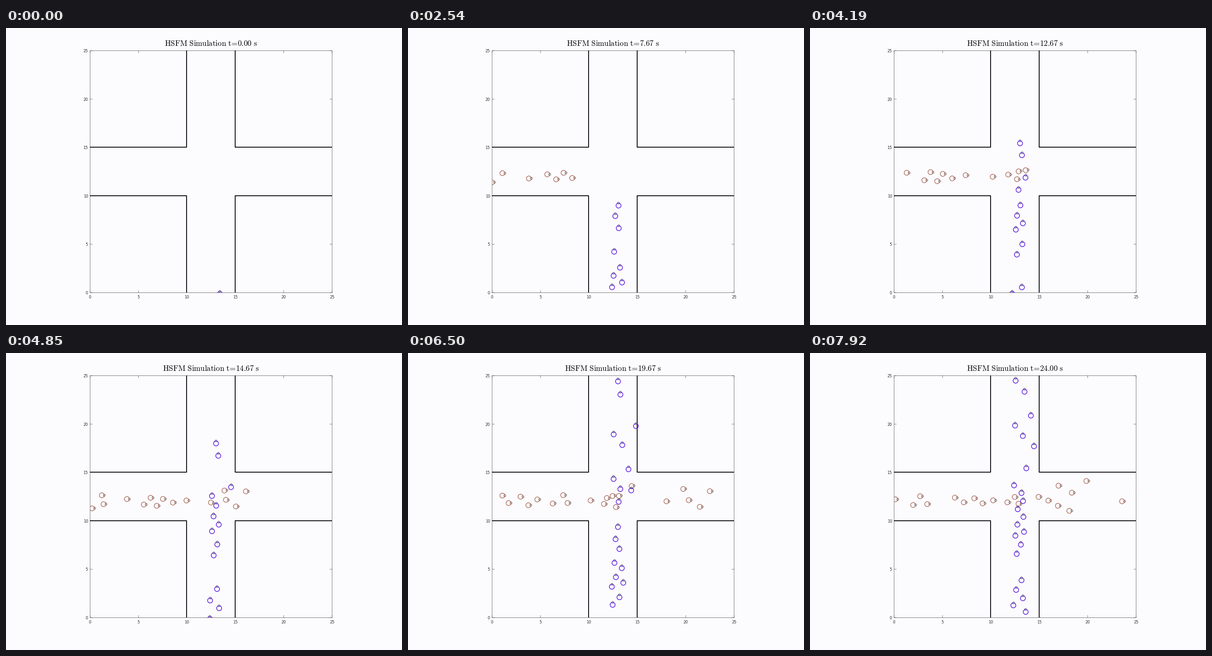
Animation of 864 by 648 pixels, one loop 8000 ms. Source, as a matplotlib script:

```python
import matplotlib.pyplot as plt
import numpy as np
from matplotlib.animation import FuncAnimation
from matplotlib.patches import Rectangle

plt.rcParams.update({"mathtext.fontset": "cm", "font.family": "DejaVu Sans"})

# The stage is laid out in pixels, y pointing down.
WIDTH, HEIGHT, DPI = 864, 648, 72
LEFT, BOTTOM, METRE, SIZE = 183, 577, 21.12, 25
INTERVAL, FRAMES, STEP_MS = 40, 200, 110
LAST_STEP, SUBSTEPS = 72, 5
INK = "#262626"

# Crowd model, in pixels and animation steps.
CRUISE, RELAX = 9.0, 2.0
CENTERING = 14.0
PUSH, PUSH_RANGE = 4.0, 4.0
BEHIND_WEIGHT = 0.25
BODY, HEAD = 10.8, 4.6
CROSSING = np.array([457.0, 323.0])
GATE_X, GATE_Y = 181, 580

# Steps at which people walk in from the left and from below.
EAST_ARRIVALS = [2, 3, 4, 7, 12, 18.6, 22, 24, 25, 26, 27.6, 33,
                 38.8, 39.2, 42, 46, 48, 50, 53, 54.4, 62, 63.6, 65, 70.4]
NORTH_ARRIVALS = [0, 1.6, 5.2, 11, 15, 16.6, 18.4, 19.4, 24.2, 26.6, 35, 37.8, 39.8,
                  44, 45, 45.6, 47, 48.6, 52, 53.6, 61, 62.8, 64.8, 67, 68.8]


def spread(count, rng):
    """Lateral entry offsets, alternating between the two sides."""
    return rng.uniform(2, 17, count) * (-1) ** np.arange(count)


def simulate():
    """Return positions, head positions and presence for every step."""
    rng = np.random.default_rng(4)
    n_east, n_north = len(EAST_ARRIVALS), len(NORTH_ARRIVALS)
    arrivals = np.array(EAST_ARRIVALS + NORTH_ARRIVALS)
    forward = np.repeat([[1.0, 0.0], [0.0, -1.0]], [n_east, n_north], axis=0)
    side = np.abs(forward[:, ::-1])
    gate = np.repeat([[GATE_X, CROSSING[1]], [CROSSING[0], GATE_Y]],
                     [n_east, n_north], axis=0)
    offset = np.concatenate([spread(n_east, rng), spread(n_north, rng)])
    pos = gate + side * offset[:, None]
    vel = np.zeros_like(pos)
    dt = 1 / SUBSTEPS
    record = []

    for tick in range(LAST_STEP * SUBSTEPS + 1):
        active = arrivals <= tick * dt + 1e-9
        if tick % SUBSTEPS == 0:
            turn = np.clip(np.sum(vel * side, axis=1) / CRUISE, -.15, .15)
            heads = pos + BODY / 2 * (forward + side * turn[:, None])
            record.append((pos.copy(), heads, active))

        # Aim for the middle of the crossing, then keep straight on.
        to_center = np.sum((CROSSING - pos) * side, axis=1)
        before = np.sum((CROSSING - pos) * forward, axis=1) > 0
        desired = CRUISE * forward + side * (before * to_center / CENTERING)[:, None]

        # Keep clear of others, above all of those ahead.
        gap = pos[:, None] - pos[None]
        dist = np.maximum(np.linalg.norm(gap, axis=2), 1e-6)
        ahead = np.sum(gap * forward[:, None], axis=2) < 0
        push = PUSH * np.exp((BODY - dist) / PUSH_RANGE)
        push *= np.where(ahead, 1, BEHIND_WEIGHT) * (active[:, None] & active[None])
        repulsion = np.sum((push / dist)[..., None] * gap, axis=1)

        vel += dt * active[:, None] * ((desired - vel) / RELAX + repulsion)
        pos += dt * vel
    return record


def px(x):
    return LEFT + METRE * np.asarray(x)


def py(y):
    return BOTTOM - METRE * np.asarray(y)


fig = plt.figure(figsize=(WIDTH / DPI, HEIGHT / DPI), dpi=DPI, facecolor="#fcfcfe")
ax = fig.add_axes([0, 0, 1, 1])
ax.set(xlim=(0, WIDTH), ylim=(HEIGHT, 0))
ax.set_axis_off()

# Hairlines sit on pixel centres.
hairline = dict(color=INK, lw=.6, snap=False)
frame_box = Rectangle((px(0) + .5, py(SIZE) + .5), SIZE * METRE, SIZE * METRE,
                      fill=False, **hairline)
ax.add_patch(frame_box)

for value in range(0, SIZE + 1, 5):
    x, y = px(value) + .5, py(value) + .5
    ax.text(x, 586, value, size=8.3, color=INK, ha="center", va="center_baseline")
    ax.text(179, y, value, size=8.3, color=INK, ha="right", va="center_baseline")
    for edge, inward in ((0, 5), (SIZE, -5)):
        edge_x, edge_y = px(edge) + .5, py(edge) + .5
        ax.plot([x, x], [edge_y, edge_y - inward], **hairline)
        ax.plot([edge_x, edge_x + inward], [y, y], **hairline)

for wall_x, end_x in ((10, 0), (15, SIZE)):
    for wall_y, end_y in ((10, 0), (15, SIZE)):
        ax.plot(px([wall_x, wall_x, end_x]), py([end_y, wall_y, wall_y]),
                color="#0c0a10", lw=1.9, solid_capstyle="butt", zorder=3)


def rings(diameter, width, zorder):
    ring = ax.scatter([], [], s=diameter ** 2, facecolors="none",
                      edgecolors=INK, linewidths=width, zorder=zorder)
    ring.set_clip_path(frame_box)
    return ring


bodies = rings(BODY, 1.5, 4)
heads = rings(HEAD, .7, 5)
title = ax.text(447.5, 39, "", size=16.95, color="black", ha="center", va="baseline")

tracks = simulate()
counts = [len(EAST_ARRIVALS), len(NORTH_ARRIVALS)]
body_colors = np.repeat(["#b4766a", "#5f1ee6"], counts)
head_colors = np.repeat(["#4a3a34", "#3a3446"], counts)


def update(frame):
    step = (frame * INTERVAL + INTERVAL // 2) // STEP_MS
    body_pos, head_pos, active = tracks[step]
    bodies.set_offsets(body_pos[active])
    heads.set_offsets(head_pos[active])
    bodies.set_edgecolors(list(body_colors[active]))
    heads.set_edgecolors(list(head_colors[active]))
    title.set_text(r"$\mathrm{HSFM~Simulation~t}\!=\!\mathrm{%.2f~s}$" % (step / 3))
    return bodies, heads, title


animation = FuncAnimation(fig, update, frames=FRAMES, interval=INTERVAL,
                          repeat=True, repeat_delay=0, blit=False)
plt.show()
```
